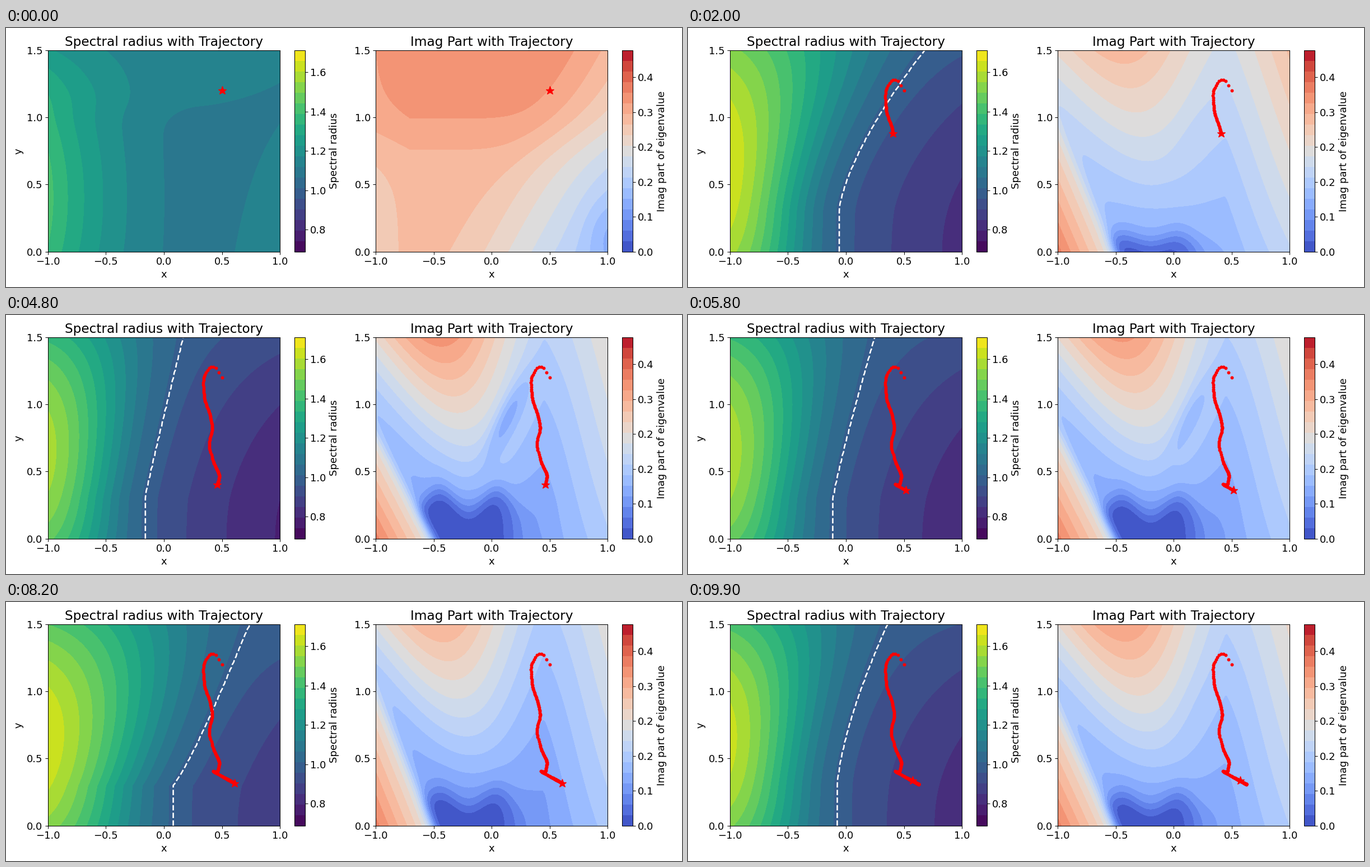
A matplotlib script for the animation above (10000 ms loop, 1207 by 464 pixels).

```python
import numpy as np
import matplotlib.pyplot as plt
from matplotlib.animation import FuncAnimation
from matplotlib.cm import ScalarMappable
from matplotlib.colors import BoundaryNorm, ListedColormap

W, H, DPI = 1207, 464, 64
PT = 92.8 / DPI          # scales nominal points to this dpi
PX = 72 / DPI            # points per pixel
FRAMES, BANDS = 100, 19
UNIT = 5.79              # spectral radius 1.0, counted in colour bands
SETTLE = 9               # frames until the initial field has faded out

plt.rcParams.update({
    "font.family": "DejaVu Sans", "font.size": 14 * PT,
    "axes.titlesize": 18 * PT, "axes.titlepad": 6 * PT,
    "axes.labelpad": 4 * PT, "axes.linewidth": 0.8 * PT,
    "xtick.major.size": 3.5 * PT, "ytick.major.size": 3.5 * PT,
    "xtick.major.width": 0.8 * PT, "ytick.major.width": 0.8 * PT,
    "xtick.major.pad": 3.5 * PT, "ytick.major.pad": 3.5 * PT,
})

# Shape parameters of the two fields at a few moments.
MOMENTS = [SETTLE, 32, 48, 69, 82, 99]
SHAPE = {
    "foot": [-0.06, -0.05, -0.16, -0.05, 0.08, -0.07],   # unit contour, bottom
    "head": [0.89, 0.45, 0.17, 0.34, 0.735, 0.36],       # unit contour, top
    "bow": [1.5, 1.4, 1.05, 1.2, 0.85, 1.45],            # its curvature
    "peak": [18, 17.7, 16.5, 16.9, 17.8, 17.4],          # maximum at left
    "sink": [2.7, 2.6, 1.9, 2.6, 3.3, 2.5],              # minimum at right
    "trough": [5.8, 4.6, 4.2, 4.1, 3.8, 4.4],            # cool channel
    "mound": [2.5, 7.3, 9, 8.5, 7.8, 8.2],               # warm hill on top
    "wedge": [0.98, 0.92, 0.77, 0.82, 1, 0.88],          # warm corner height
    "floor": [0.05, 0.14, 0.28, 0.2, 0.2, 0.18],         # zero region height
    "crease": [0, 0.5, 3, 0.5, 0, 0.3],                  # cold streak
    "bulge": [2, 5.3, 5.3, 5.3, 5.3, 5.3],
    "rise": [2.4, 0.9, 0.9, 0.9, 0.9, 0.9],
}

X, Y = np.meshgrid(np.linspace(-1, 1, 101), np.linspace(0, 1.5, 76))


def sigmoid(u):
    return 1 / (1 + np.exp(-np.clip(u, -50, 50)))


def bell(u):
    return np.exp(-u**2)


def ramp(u):
    return np.maximum(u, 0)


def initial_radius():
    west = (5.7 - 3.2 * (Y - 0.4)**2) * (ramp(0.3 - X) / 1.3)**2
    north = 0.6 * sigmoid((Y - 1.07 - 0.27 * ramp(X)**2) / 0.06)
    east = 0.7 * ramp((X - 0.1) / 0.9)**1.5 * ramp(1 - 0.6 * Y)
    return 7.7 + west + north + east


def initial_imag():
    north = 2.4 * sigmoid((Y - 0.85) / 0.13)
    slope = 0.5 * np.logaddexp(0, 10 * (X + 0.3 - 0.62 * Y))
    cold = 1.3 * bell((X - 1) / 0.2) * bell((Y - 0.15) / 0.25)
    return 12.2 + north - slope - cold - 2 * ramp(-0.7 - X)


def radius_field(p):
    """Falls from a hill at left, through the unit contour, to the right."""
    contour = p["foot"] + (p["head"] - p["foot"]) * ramp((Y - 0.3) / 1.2)**p["bow"]
    hill = p["peak"] - p["bulge"] * (Y - 0.65)**2
    basin = p["sink"] + 1.1 * Y**2
    left = ramp((contour - X) / (contour + 1))
    right = ramp((X - contour) / (1 - contour))
    left = 0.5 * left + 0.25 * (1 - np.cos(np.pi * left))
    return UNIT + (hill - UNIT) * left - (UNIT - basin) * right**0.65


def imag_field(p):
    z = p["trough"] + p["rise"] * Y
    z = z + (2.6 + 1.2 * Y) * ramp((X - 0.45) / 0.55)
    z += p["mound"] * ramp((Y - 0.25) / 1.25) * bell(
        (X + 0.03 + 0.28 * Y) / (0.3 + 0.25 * Y))
    z -= p["crease"] * bell((X - 0.13 - 0.5 * (Y - 0.9)) / 0.1) * bell((Y - 0.9) / 0.3)
    edge = p["floor"] * (1 + 0.25 * np.cos(4 * np.pi * (X - 0.05)))
    z *= 1 - sigmoid((edge - Y) / 0.05) * sigmoid((0.2 - X) / 0.08)
    inside = -0.53 - 0.47 * Y / p["wedge"] - X
    warm = sigmoid((inside + 0.02) / 0.03)
    return z + (9.5 + 12.5 * inside - z) * warm


RADIUS_0, IMAG_0 = initial_radius(), initial_imag()


def fields(frame):
    p = {name: np.interp(frame, MOMENTS, row) for name, row in SHAPE.items()}
    u = min(frame / SETTLE, 1)**0.7
    pairs = (RADIUS_0, radius_field(p)), (IMAG_0, imag_field(p))
    return [np.clip(a + (b - a) * u, 0.01, BANDS - 0.01) for a, b in pairs]


def spline(t, knots, values):
    k, v = np.array(knots, float), np.array(values, float)
    slope = 0.8 * np.gradient(v, k, axis=0)
    i = np.clip(np.searchsorted(k, t, side="right") - 1, 0, len(k) - 2)
    h = (k[i + 1] - k[i])[:, None]
    u = (t - k[i])[:, None] / h
    ease = u * u * (3 - 2 * u)
    return (v[i] * (1 - ease) + v[i + 1] * ease
            + h * u * (1 - u) * ((1 - u) * slope[i] - u * slope[i + 1]))


def trajectory():
    """Two points per frame: a descent, then a wavering drift along a line."""
    t = np.arange(0, FRAMES - 0.5, 0.5)
    turn = 52
    path = spline(np.minimum(t, turn), [0, 1, 2, 4, 9, 18, 23, 29, 32, 44, 48, turn], [
        (0.5, 1.2), (0.448, 1.27), (0.407, 1.28), (0.354, 1.222),
        (0.345, 1.076), (0.398, 0.914), (0.417, 0.823), (0.39, 0.686),
        (0.417, 0.598), (0.475, 0.457), (0.46, 0.403), (0.422, 0.405)])
    late = ramp(t - turn)
    drift = (0.8 * (1 - np.exp(-late / 7))
             + 0.25 * late / 47 * np.sin(2 * np.pi * (t - 77) / 40))
    return (path + drift[:, None] * np.array([0.207, -0.098])).T


path_x, path_y = trajectory()
fig = plt.figure(figsize=(W / DPI, H / DPI), dpi=DPI, facecolor="white")
levels = np.arange(BANDS + 1)


def box(x0, x1, y0=40, y1=400.7):
    return fig.add_axes([x0 / W, 1 - y1 / H, (x1 - x0) / W, (y1 - y0) / H])


def make_panel(x0, x1, title):
    ax = box(x0, x1)
    ax.set(xlim=(-1, 1), ylim=(0, 1.5), xlabel="x", title=title,
           xticks=np.arange(-1, 1.1, 0.5), yticks=np.arange(0, 1.6, 0.5))
    dots, = ax.plot([], [], "o", color="red", ms=4.6 * PX, mew=1.3 * PX, zorder=3)
    star, = ax.plot([], [], "*", color="red", ms=15.5 * PX, mew=1.3 * PX, zorder=4)
    return ax, dots, star


def make_bar(x0, x1, name, ticks, labels, title):
    cmap = ListedColormap(plt.get_cmap(name)((levels[:-1] + 0.5) / BANDS))
    bar = fig.colorbar(ScalarMappable(BoundaryNorm(levels, BANDS), cmap),
                       cax=box(x0, x1), spacing="proportional")
    bar.set_ticks(ticks, labels=labels)
    bar.minorticks_off()
    bar.set_label(title)
    return cmap.colors


left = make_panel(74.6, 489.4, "Spectral radius with Trajectory")
right = make_panel(660, 1074.4, "Imag Part with Trajectory")
left[0].set_ylabel("y")
viridis = make_bar(515.4, 534, "viridis", 2.08 + 3.713 * np.arange(5),
                   ["0.8", "1.0", "1.2", "1.4", "1.6"], "Spectral radius")
coolwarm = make_bar(1100.2, 1119, "coolwarm", 3.29 * np.arange(6),
                    ["0.0", "0.1", "0.2", "0.2", "0.3", "0.4"],
                    "Imag part of eigenvalue")
drawn = []


def update(frame):
    while drawn:
        drawn.pop().remove()
    radius, imag = fields(frame)
    drawn.append(left[0].contourf(X, Y, radius, levels, colors=viridis))
    drawn.append(right[0].contourf(X, Y, imag, levels, colors=coolwarm))
    if radius.min() < UNIT:
        drawn.append(left[0].contour(X, Y, radius, [UNIT], colors="white",
                                     linestyles="--", linewidths=2 * PT))
    n = 2 * frame + 1
    for _, dots, star in (left, right):
        dots.set_data(path_x[:n], path_y[:n])
        star.set_data(path_x[n - 1:n], path_y[n - 1:n])
    return []


anim = FuncAnimation(fig, update, frames=FRAMES, interval=100, repeat=True,
                     repeat_delay=0, init_func=lambda: update(0))
plt.show()
```
